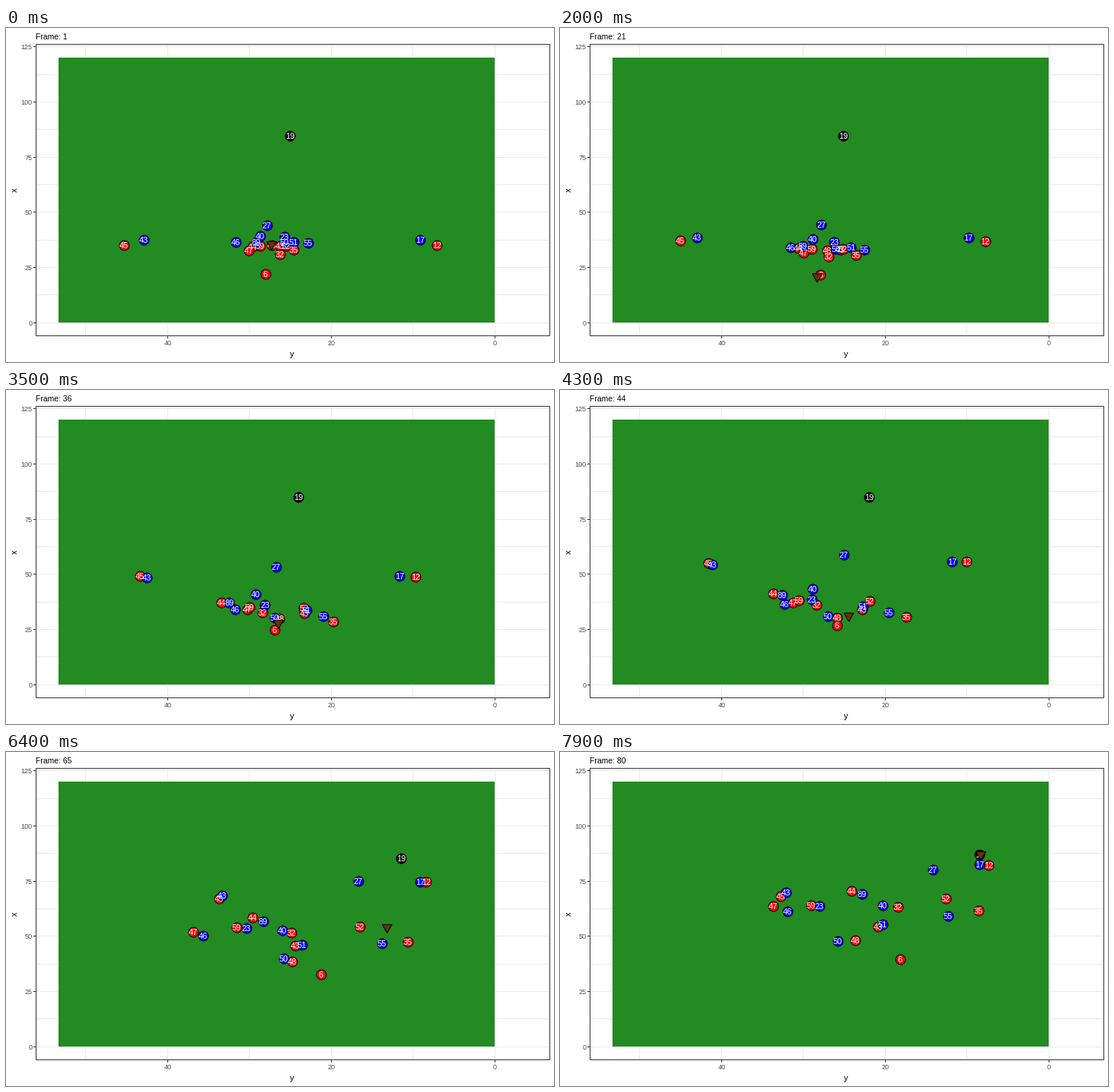
Recreate the animation shown at these times as a matplotlib script. Size 720 px wide and 440 px high, loop 8000 ms.

```python
import numpy as np
import matplotlib.pyplot as plt
from matplotlib.animation import FuncAnimation
from matplotlib.patches import Polygon, Rectangle

W, H, DPI = 720, 440, 80
FRAMES, INTERVAL = 80, 100
PT = 72 / DPI  # points per pixel

plt.rcParams["font.family"] = "Liberation Sans"
plt.rcParams["path.snap"] = False
fig = plt.figure(figsize=(W / DPI, H / DPI), dpi=DPI, facecolor="white")
ax = fig.add_axes([0, 0, 1, 1])
ax.set_xlim(0, W)
ax.set_ylim(H, 0)
ax.axis("off")

LEFT, RIGHT, TOP, BOTTOM = 39.5, 714.5, 21.5, 405.5


def col(y):
    return np.floor(642 - 10.75 * y) + 0.5


def row(x):
    return np.floor(388.3 - 2.908 * x) + 0.5


def line(xs, ys, color, z):
    ax.plot(xs, ys, color=color, lw=PT, zorder=z, solid_capstyle="butt")


def write(x, y, s, px, color, **kw):
    return ax.text(x, y, s, fontsize=px * PT, color=color, **kw)


# Panel, grid and axes
for y in range(0, 51, 10):
    line([col(y)] * 2, [TOP, BOTTOM], "#EBEBEB", 0)
for x in np.arange(0, 126, 12.5):
    line([LEFT, RIGHT], [row(x)] * 2, "#EBEBEB", 0)
ax.add_patch(Rectangle((69, 39), 573, 349, fc="#228B22", ec="none", zorder=1))
ax.add_patch(Rectangle((LEFT, TOP), RIGHT - LEFT, BOTTOM - TOP, fc="none",
                       ec="#333333", lw=PT, zorder=20))
for y in (0, 20, 40):
    line([col(y)] * 2, [406, 409], "#333333", 2)
    write(col(y), 418.5, str(y), 9, "#4D4D4D", ha="center")
for x in range(0, 126, 25):
    line([36, 39], [row(x)] * 2, "#333333", 2)
    write(34.3, row(x) + 3.5, str(x), 9, "#4D4D4D", ha="right")
write(376, 433, "y", 11, "black", ha="center")
write(12, 213, "x", 11, "black", ha="center", va="center", rotation=90)
title = write(39, 15, "", 10.4, "black")


def glide(times, points, t, start=(0, 0)):
    """Smooth path through the points, waiting at the first one."""
    times, points = np.array(times, float), np.array(points, float)
    slope = np.gradient(points, times, axis=0, edge_order=2)
    slope[0] = start
    t = max(t, times[0])
    i = min(np.searchsorted(times, t, side="right") - 1, len(times) - 2)
    h = times[i + 1] - times[i]
    u = (t - times[i]) / h
    return ((1 + 2 * u) * (1 - u) ** 2 * points[i]
            + u * (1 - u) ** 2 * h * slope[i]
            + u * u * (3 - 2 * u) * points[i + 1]
            + u * u * (u - 1) * h * slope[i + 1])


class Team:
    keys = [10, 43, 64, 79]  # snap, kick, flight, catch

    def __init__(self, color, z, push):
        self.push, self.players = (0, push), []
        self.dots, = ax.plot([], [], "o", ms=13 * PT, mfc=color, mec="black",
                             mew=PT, zorder=z)

    def add(self, number, *route):
        label = write(0, 0, str(number), 11, "white", ha="center", zorder=6)
        self.players.append((label, route))

    def move(self, t):
        spots = [glide(self.keys, route, t, self.push)
                 for _, route in self.players]
        self.dots.set_data(*zip(*spots))
        for (label, _), (x, y) in zip(self.players, spots):
            label.set_position((x, y + 4))


# Both lines push into the backfield at the snap, the rushers harder
red, blue, black = Team("red", 3, 0.6), Team("blue", 4, 0.9), Team("black", 5, 0)

red.add(45, (155, 286), (195, 228), (280, 193), (290, 190))
red.add(44, (324, 288), (280, 268), (324, 218), (383, 183))
red.add(47, (319, 293), (306, 280), (246, 237), (280, 203))
red.add(59, (334, 287), (314, 277), (303, 231), (330, 202))
red.add(48, (349, 286), (364, 300), (376, 276), (388, 248))
red.add(43, (360, 287), (397, 289), (380, 255), (418, 230))
red.add(32, (360, 298), (337, 283), (375, 238), (444, 204))
red.add(52, (368, 287), (407, 278), (465, 230), (507, 193))
red.add(35, (378, 292), (455, 299), (528, 250), (550, 209))
red.add(12, (566, 286), (534, 226), (552, 171), (563, 149))
red.add(6, (341, 324), (364, 310), (414, 293), (447, 273))

blue.add(43, (181, 279), (200, 230), (284, 189), (297, 185))
blue.add(46, (302, 282), (295, 282), (259, 242), (299, 210))
blue.add(89, (329, 282), (292, 270), (338, 223), (397, 187))
blue.add(40, (334, 274), (332, 262), (363, 235), (424, 202))
blue.add(27, (343, 260), (373, 217), (463, 170), (490, 155))
blue.add(23, (366, 275), (331, 276), (316, 232), (341, 203))
blue.add(50, (366, 282), (352, 298), (365, 272), (365, 249))
blue.add(51, (378, 282), (398, 285), (389, 254), (424, 227))
blue.add(55, (397, 283), (432, 293), (494, 252), (510, 216))
blue.add(17, (544, 279), (515, 226), (544, 171), (551, 148))

black.add(19, (373, 142), (406, 141), (519, 140), (551, 135))

# Ball: snapped back, carried, then kicked
BALL_KEYS = [11, 20, 35, 43, 54, 79]
BALL_PATH = [(349, 285), (338, 327.5), (358, 307), (379.5, 297.5),
             (450, 272.5), (553, 135)]
TRIANGLE = np.array([(-6.5, -3.7), (6.5, -3.7), (0, 7.5)])
ball = Polygon(TRIANGLE, fc="#663300", ec="black", lw=PT, zorder=9)
ax.add_patch(ball)


def update(t):
    title.set_text(f"Frame: {t + 1}")
    for team in (red, blue, black):
        team.move(t)
    ball.set_xy(TRIANGLE + glide(BALL_KEYS, BALL_PATH, t))
    return []


anim = FuncAnimation(fig, update, frames=FRAMES, interval=INTERVAL,
                     init_func=lambda: update(0), repeat=True, repeat_delay=0)
plt.show()
```
